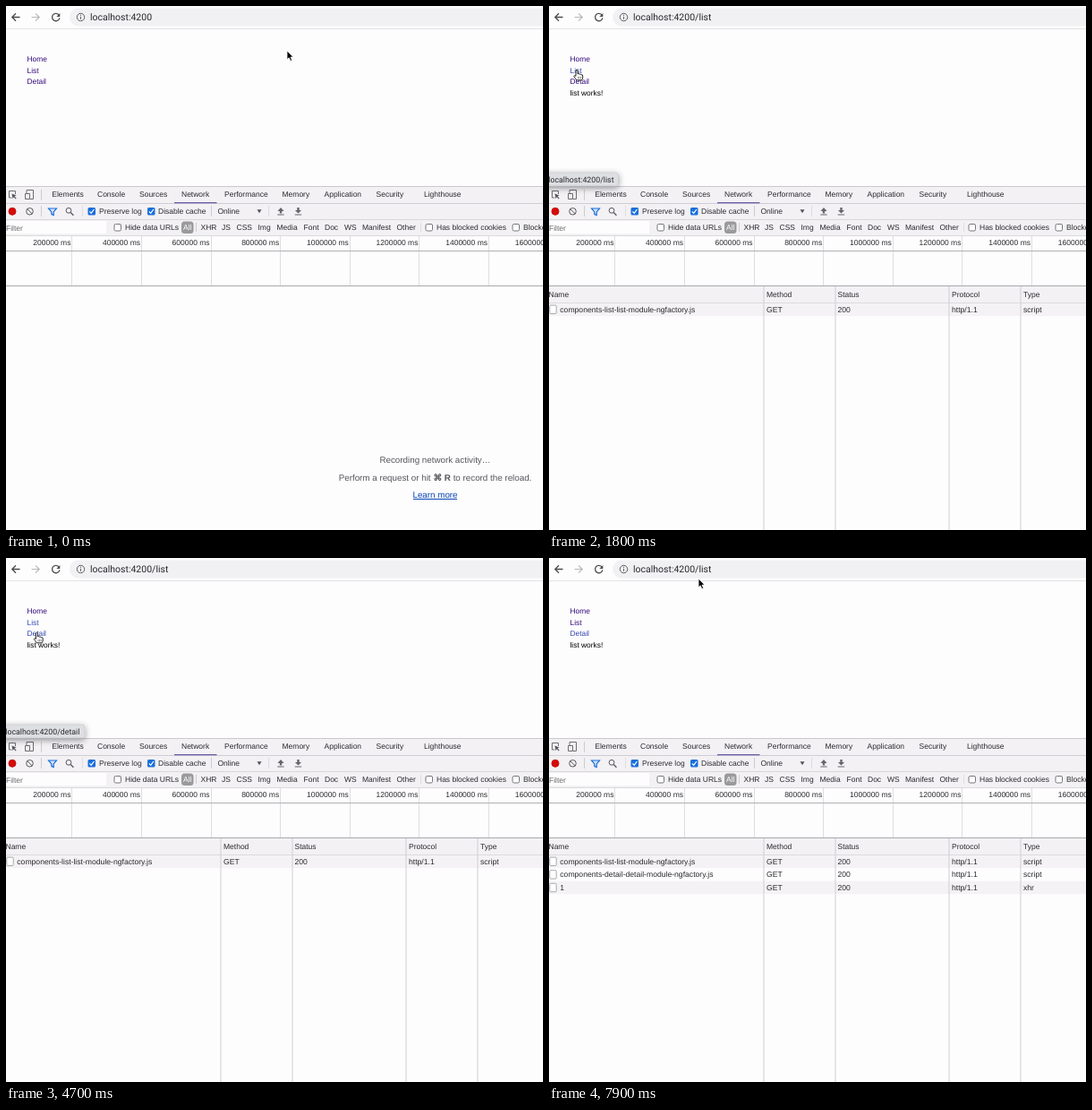
An HTML page for the animation above (8000 ms loop, 600 by 585 pixels).

```html
<!DOCTYPE html>
<html lang="en">
<head>
<meta charset="utf-8">
<style>
  html, body { margin: 0; width: 100%; height: 100%; overflow: hidden; background: #fefdfe; }
  svg { display: block; }
  text { font: 8.5px "Liberation Sans", Arial, sans-serif; fill: #29292d; white-space: pre; text-rendering: geometricPrecision; }
  .cell { font-size: 8.62px; }
  .link { font-size: 8.4px; fill: #300a78; }
  .link.active { fill: #3048b0; }
  .page { font-size: 8.4px; fill: #000; }
  .url { font: 10.5px Roboto, sans-serif; }
  .status { font: 8.8px Roboto, sans-serif; }
  .empty { font-size: 9.8px; fill: #55555a; text-anchor: middle; }
  .end { text-anchor: end; }
</style>
</head>
<body>
<svg id="stage" width="600" height="585" viewBox="0 0 600 585"></svg>
<script>
const text = (x, y, s, cls = '', more = '') => `<text x="${x}" y="${y}" class="${cls}" ${more}>${s}</text>`;
const rect = (x, y, w, h, fill, more = '') => `<rect x="${x}" y="${y}" width="${w}" height="${h}" fill="${fill}" ${more}/>`;
const path = (d, stroke, width = 1, fill = 'none') =>
  `<path d="${d}" stroke="${stroke}" stroke-width="${width}" fill="${fill}"/>`;
const circle = (x, y, r, stroke, fill = 'none') =>
  `<circle cx="${x}" cy="${y}" r="${r}" stroke="${stroke}" fill="${fill}"/>`;
const hline = (y, color, h = 1) => rect(0, y, 600, h, color);
const vline = (x, y, h, color = '#ccc') => rect(x, y, 1, h, color);
const labels = (list, y) => list.map(([x, s]) => text(x, y, s)).join('');
const group = (id, body) => `<g id="${id}">${body}</g>`;

const checkbox = (x, y, on) => on
  ? rect(x, y, 8.5, 8.5, '#1a6fdb', 'rx="1.5"') + path(`M${x + 1.8} ${y + 4.4}l1.9 2 3.2-4.4`, '#fff', 1.2)
  : rect(x + .5, y + .5, 7.5, 7.5, '#fff', 'rx="1.5" stroke="#77777b"');

const browserBar = () =>
  rect(71, 2.5, 560, 20, '#f1f0f3', 'rx="10"') + hline(25, '#e3e2e5') +
  path('M15.5 12.5H7M11 8.3l-4.2 4.2 4.2 4.2', '#4b4c50', 1.3) +
  path('M28.5 12.5H37M33 8.3l4.2 4.2-4.2 4.2', '#b8b8bc', 1.2) +
  path('M59 9.8a4.2 4.2 0 1 0 .9 3.6', '#4b4c50', 1.3) + path('M60.3 8v4h-4z', 'none', 0, '#4b4c50') +
  circle(83.5, 12.5, 4.2, '#5f6064') + path('M83.5 11.8v3M83.5 9.7v1.1', '#5f6064') +
  text(94, 16.4, 'localhost:4200', 'url', 'id="url"');

const links = () =>
  ['Home', 'List', 'Detail'].map((s, i) => text(23.5, 62.4 + 12.5 * i, s, 'link', `id="${s}"`)).join('') +
  text(23.5, 99.9, 'list works!', 'page', 'id="works"');

const tabBar = () =>
  rect(0, 201, 600, 55, '#f3f1f4') + hline(201, '#c9c8cc') + hline(220, '#cfced2') + hline(238, '#d8d7da') +
  path('M10.5 210v-3.5h-7v7.5h3', '#6c6c70') +
  path('M6.5 209.5l5 2-2 .9 2.2 2.3-.9.9-2.2-2.3-1 2z', 'none', 0, '#55565a') +
  path('M23 210v-4.5h7.5v10H27M21.5 209.5h5v6h-5z', '#6c6c70') + vline(39, 205, 12) +
  labels([[51.3, 'Elements'], [102, 'Console'], [149, 'Sources'], [196, 'Network'], [244, 'Performance'],
    [308.5, 'Memory'], [355.5, 'Application'], [413.5, 'Security'], [467, 'Lighthouse']], 213.2) +
  rect(188, 219, 47.5, 1.3, '#6a62a8');

const toolBar = () =>
  circle(7, 229.3, 4, '#c8100c', '#d50b08') +
  circle(26.5, 229.3, 3.8, '#55565a') + path('M23.9 226.7l5.2 5.2', '#55565a') + vline(39, 223, 12) +
  path('M47.5 226h9l-3.3 3.9v3.6l-2.4-1v-2.6z', '#1a6fdb', 1.2, '#d5e4f8') +
  circle(70, 228.3, 2.9, '#55565a') + path('M72.2 230.5l3.2 3.2', '#55565a', 1.3) + vline(85, 223, 12, '#dddce0') +
  checkbox(91.5, 225, true) + checkbox(158, 225, true) + vline(229, 223, 12) + vline(293, 223, 12, '#dddce0') +
  labels([[104, 'Preserve log'], [170, 'Disable cache'], [236.5, 'Online']], 232.2) +
  path('M280.5 227.3h5l-2.5 4z', 'none', 0, '#55565a') +
  path('M307 225l-3.6 4h2.4v2.6h2.4V229h2.4zM303.3 232.4h7.4v1.2h-7.4z', 'none', 0, '#66666a') +
  path('M326.5 231.4l-3.6-3.5h2.4V225h2.4v2.9h2.4zM322.8 232.4h7.4v1.2h-7.4z', 'none', 0, '#66666a');

const filterBar = () =>
  rect(0, 240, 112, 14, '#fefdfe') + text(0, 250.5, 'Filter', '', 'style="fill:#6c6c70"') +
  checkbox(120.5, 243, false) + checkbox(468.5, 243, false) + checkbox(565.5, 243, false) +
  rect(196, 240.5, 13.5, 13.5, '#9a999c', 'rx="3.5"') + text(198, 250.3, 'All', '', 'style="fill:#fff"') +
  vline(212, 242, 10) + vline(463, 242, 10, '#dddce0') +
  labels([[133, 'Hide data URLs'], [217.5, 'XHR'], [241, 'JS'], [257.5, 'CSS'], [281.5, 'Img'], [302.5, 'Media'],
    [332.5, 'Font'], [356, 'Doc'], [378, 'WS'], [398, 'Manifest'], [436.5, 'Other'],
    [481, 'Has blocked cookies'], [578, 'Blocked Requests']], 250.3);

const timeline = () => {
  let s = hline(256, '#dad9dc');
  for (let i = 1; i <= 8; i++) {
    const x = 73.4 + 77.6 * (i - 1);
    s += vline(Math.round(x), 257, 55, '#dddce0') + text(x - 1, 266.6, `${i * 200000} ms`, 'end');
  }
  return s + hline(273, '#b0afb2') + hline(312, '#a9a8ab');
};

const emptyNote = () =>
  text(479.5, 510, 'Recording network activity…', 'empty') +
  text(479.5, 529.5, 'Perform a request or hit <tspan font-weight="bold">⌘ R</tspan> to record the reload.', 'empty') +
  text(479.5, 549, 'Learn more', 'empty', 'style="fill:#0b45b5"') + rect(455, 550, 49, 1, '#0b45b5');

const columns = [0, 243, 322.5, 450, 530];
const row = (i, name, type) => {
  const y = 331.5 + 14.6 * i;
  return group('row' + i,
    rect(0, y, 600, 14.6, i % 2 ? '#fefdfe' : '#f4f2f4') +
    rect(.8, y + 2.6, 7.4, 9.4, '#fff', 'rx="1" stroke="#a9a9ad"') +
    [name, 'GET', '200', 'http/1.1', type].map((s, c) => text(c ? columns[c] : 12.3, y + 10, s, 'cell')).join(''));
};
const table = () => group('table',
  rect(0, 313, 600, 272, '#fefdfe') + rect(0, 313, 600, 18, '#f3f1f4') + hline(331, '#c4c3c6') +
  ['Name', 'Method', 'Status', 'Protocol', 'Type'].map((s, c) => text(columns[c] - (c ? 0 : .5), 325, s)).join('') +
  row(0, 'components-list-list-module-ngfactory.js', 'script') +
  row(1, 'components-detail-detail-module-ngfactory.js', 'script') +
  row(2, '1', 'xhr') +
  [239.5, 319.5, 446.5, 526.5].map(x => vline(x, 313, 272, '#cfced2')).join(''));

const statusBubble = () => group('bubble',
  rect(-6, 186, 84, 15, '#dedfe2', 'id="bubbleBox" rx="3" stroke="#c3c3c7" stroke-width=".6" filter="url(#shadow)"') +
  text(-.7, 196.6, '', 'status', 'id="bubbleText"'));

const cursors = () =>
  group('arrow', path('M0 0V9.8L2.2 7.8 3.8 11.4 5.6 10.6 4 7.1H7Z', '#fff', .8, '#000')) +
  group('hand', path('M-1 1Q0-.6 1 1V4.8Q2.4 3.9 3 5.2 4.5 4.5 5 5.8 6.7 5.3 6.7 7V9Q6.5 10.5 5.7 11.8H-.3Q-1.6 9.5-3.2 7.6-2.9 5.8-1 7.2Z', '#111', .9, '#fff') +
    path('M1.5 7.8v2.5M3.1 7.8v2.5M4.7 7.8v2.5', '#222', .5));

const $ = id => document.getElementById(id);
$('stage').innerHTML =
  '<defs><filter id="shadow" x="-20%" y="-80%" width="140%" height="280%">' +
  '<feDropShadow dx="0" dy="2" stdDeviation="3.5" flood-opacity=".4"/></filter></defs>' +
  browserBar() + links() + tabBar() + toolBar() + filterBar() + timeline() + emptyNote() + table() +
  statusBubble() + cursors();

// Each move: start, end, target x, target y, upward bow of the path
const moves = [
  [0, 800, 31, 71, 16],
  [2400, 2700, 62.5, 75, 0],
  [3200, 3700, 34.5, 83, 0],
  [7100, 7900, 167, 23, 0]
];
function pointer(t) {
  let x = 314, y = 50;
  for (const [start, end, tx, ty, bow] of moves) {
    const p = Math.min(1, Math.max(0, (t - start) / (end - start)));
    const k = p * p * (3 - 2 * p);
    x += (tx - x) * k;
    y += (ty - y) * k - bow * Math.sin(Math.PI * k);
  }
  return [x, y];
}
function hovered(x, y) {
  if (y > 66 && y < 78 && x > 22 && x < 38) return 'List';
  if (y >= 78 && y < 91 && x > 22 && x < 46) return 'Detail';
}
const show = (id, on) => $(id).setAttribute('visibility', on ? 'inherit' : 'hidden');

function draw(t) {
  const [x, y] = pointer(t);
  const over = hovered(x, y);
  const focus = t >= 5500 ? 'Detail' : t >= 1300 ? 'List' : '';
  for (const id of ['List', 'Detail']) $(id).classList.toggle('active', id === over || id === focus);

  const loaded = t >= 1300;
  $('url').textContent = 'localhost:4200' + (loaded ? '/list' : '');
  show('works', loaded);
  show('table', loaded);
  show('row1', t >= 5500);
  show('row2', t >= 5600);
  // Hidden table keeps its rows hidden too
  if (!loaded) show('row1', false), show('row2', false);

  const route = t >= 900 && t < 2900 ? 'list' : t >= 3800 && t < 7700 ? 'detail' : '';
  show('bubble', route);
  $('bubbleText').textContent = 'localhost:4200/' + route;
  $('bubbleBox').setAttribute('width', route === 'list' ? 83.5 : 94);

  show('hand', over);
  show('arrow', !over);
  for (const id of ['hand', 'arrow']) $(id).setAttribute('transform', `translate(${x} ${y})`);
}

const began = performance.now();
let shown = -1;
function tick() {
  const t = Math.floor((performance.now() - began) % 8000 / 100) * 100;
  if (t !== shown) draw(shown = t);
  requestAnimationFrame(tick);
}
tick();
</script>
</body>
</html>
```
